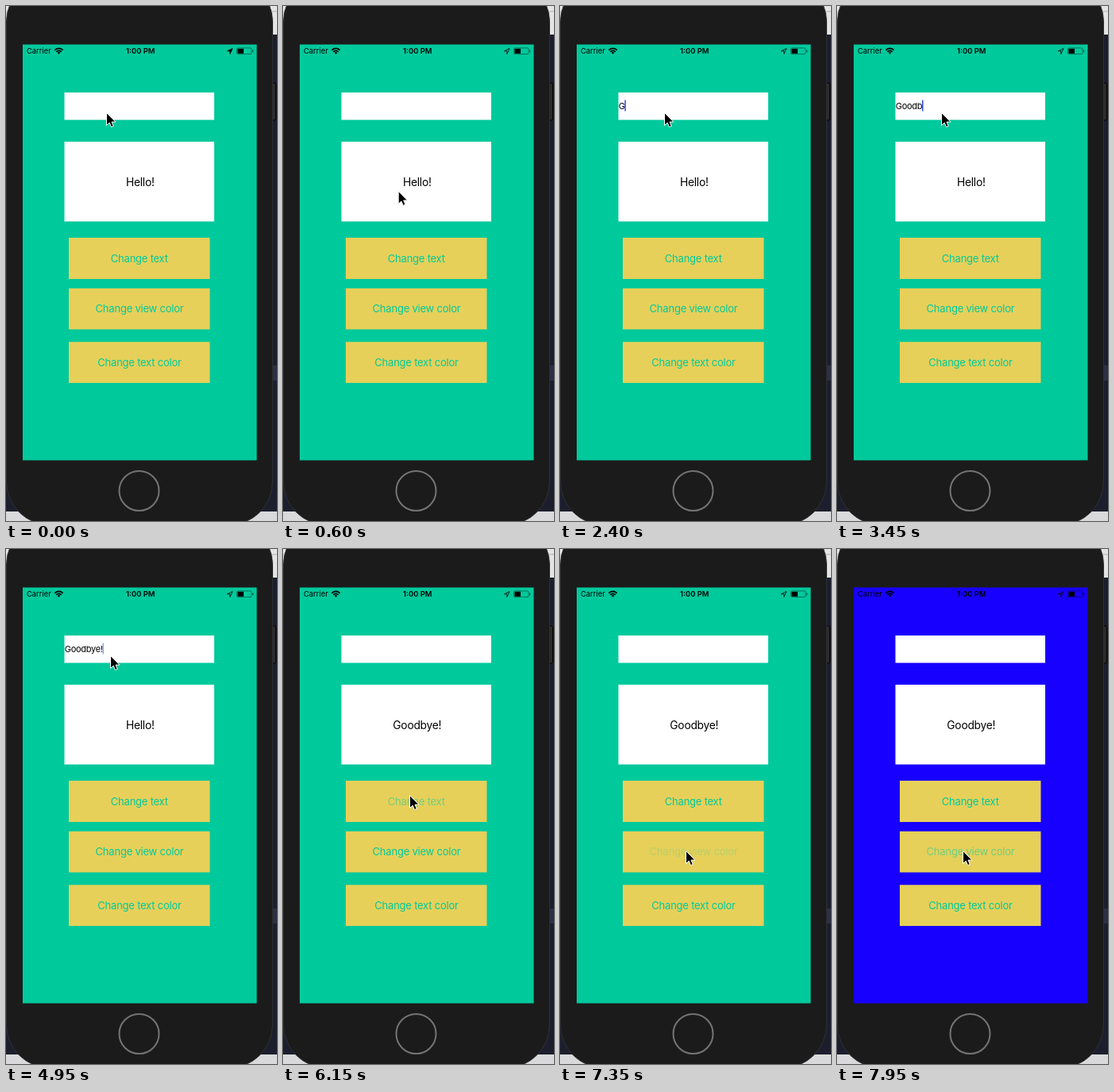
An HTML page for the animation above (8000 ms loop, 341 px wide and 649 px high).

```html
<!DOCTYPE html>
<html lang="en">
<head>
<meta charset="utf-8">
<title>Phone demo</title>
<style>
  html, body { margin: 0; height: 100%; overflow: hidden; background: #1d1e2d; }
  svg { display: block; width: 100vw; height: 100vh; font-family: Inter, Roboto, sans-serif; }
  .status { font-size: 9.4px; }
  .button text { font-size: 13px; letter-spacing: -.22px; fill: #00c99c; text-anchor: middle; }
  .button rect { fill: #e6d05a; }
  #label { font-size: 13.8px; letter-spacing: -.25px; text-anchor: middle; }
  #field { font-size: 11px; letter-spacing: -.25px; }
</style>
</head>
<body>
<svg viewBox="0 0 341 649">
  <!-- desktop behind the phone -->
  <rect width="341" height="649" fill="#1d1e2d"/>
  <rect width="341" height="36" fill="#e4e4e4"/>
  <rect y="6" width="341" height="1.5" fill="#c4c4c4"/>
  <rect x="330" y="453" width="11" height="19" fill="#2b3045"/>
  <rect y="637" width="341" height="12" fill="#d9d9db"/>
  <rect x="330" y="97" width="9.5" height="47" rx="2" fill="#2b2b2b" stroke="#000"/>

  <!-- phone -->
  <rect x=".5" y="-35" width="335" height="689" rx="55" fill="#1b1b1b" stroke="#303034"/>
  <circle cx="167.5" cy="611" r="25" fill="none" stroke="#747474" stroke-width="2"/>
  <rect id="screen" x="21" y="48.5" width="294.5" height="524"/>

  <!-- status bar -->
  <text class="status" x="26" y="60">Carrier</text>
  <g fill="none" stroke="#000" stroke-width="1.6">
    <path d="M61.3 55.6Q66.5 51.2 71.700 55.600M63.200 57.700Q66.500 54.900 69.800 57.700"/>
    <path d="M64.700 58.800Q66.500 57.400 68.300 58.800L66.500 60.800Z" fill="#000" stroke="none"/>
  </g>
  <text class="status" x="169.300" y="60" text-anchor="middle" font-weight="600">1:00 PM</text>
  <path id="location" d="M285 53.500L281.800 60.500V56.800H278.300Z" stroke="#000" stroke-width=".8"/>
  <rect x="290.500" y="52.900" width="18.500" height="7.700" rx="1.500" fill="none" stroke="#000" stroke-opacity=".55" stroke-width=".8"/>
  <rect x="291.500" y="53.800" width="7.500" height="6"/>
  <rect x="310" y="55.500" width="1.200" height="2.800" fill-opacity=".55"/>

  <!-- form -->
  <rect x="73.500" y="109" width="188.500" height="34.500" fill="#fff"/>
  <rect x="73.500" y="171" width="188.500" height="100.500" fill="#fff"/>
  <text id="field" x="73.700" y="130"></text>
  <rect id="caret" y="118.500" width="1.500" height="14" fill="#3048e0"/>
  <text id="label" x="168.800" y="226.500"></text>
  <g class="button"><rect x="79" y="292" width="177.500" height="52"/><text x="167.800" y="322.800">Change text</text></g>
  <g class="button"><rect x="79" y="355.800" width="177.500" height="51.700"/><text x="168" y="386.400">Change view color</text></g>
  <g class="button"><rect x="79" y="423.300" width="177.500" height="51.700"/><text x="168" y="454">Change text color</text></g>

  <path id="cursor" d="M0 0V16L3.700 12.600L6 18L8.800 16.900L6.500 11.600H11.400Z" stroke="#fff"/>
</svg>
<script>
const LOOP = 8000, STEP = 150;
const $ = id => document.getElementById(id);
const buttonTexts = document.querySelectorAll('.button text');

// Each track lists [start time, value...] in order.
const typed = [[0, ''], [2400, 'G'], [2700, 'Go'], [2850, 'Goo'], [3000, 'Good'], [3450, 'Goodb'],
  [3600, 'Goodby'], [3750, 'Goodbye'], [4500, 'Goodbye!'], [6150, '']];
const caretAlpha = [[0, 0], [1050, .5], [1200, 1], [1650, .5], [1800, 0], [2100, 1], [4350, .5],
  [4500, 1], [4950, .5], [5100, 0], [5400, 1], [6000, .5], [6150, 0]];
const textAlpha = [[0, 1], [6000, .2], [6150, .5], [6300, .8], [6450, 1]];
const viewAlpha = [[0, 1], [7350, .2], [7950, .5]];
const cursorPath = [[0, 126.500, 134.500], [450, 150, 268], [900, 131.500, 134.500], [5250, 131.500, 134.500],
  [5700, 159.500, 310.500], [6600, 159.500, 310.500], [7200, 158.500, 380.500]];

const indexAt = (track, t) => track.findLastIndex(key => key[0] <= t);
const valueAt = (track, t) => track[indexAt(track, t)][1];

function cursorAt(t) {
  const i = indexAt(cursorPath, t);
  const [start, x, y] = cursorPath[i];
  const [end, nextX, nextY] = cursorPath[i + 1] || [LOOP, x, y];
  const p = (t - start) / (end - start);
  const eased = p * p * (3 - 2 * p);
  return [x + (nextX - x) * eased, y + (nextY - y) * eased];
}

function draw(now) {
  const t = Math.floor((now % LOOP) / STEP) * STEP;
  const field = $('field');
  field.textContent = valueAt(typed, t);
  $('caret').setAttribute('x', 73.400 + field.getComputedTextLength());
  $('caret').setAttribute('opacity', valueAt(caretAlpha, t));
  $('label').textContent = t < 6150 ? 'Hello!' : 'Goodbye!';
  $('screen').setAttribute('fill', t < 7950 ? '#00c99c' : '#1800ff');
  $('location').setAttribute('fill', t < 600 ? '#000' : 'none');
  buttonTexts[0].setAttribute('opacity', valueAt(textAlpha, t));
  buttonTexts[1].setAttribute('opacity', valueAt(viewAlpha, t));
  $('cursor').setAttribute('transform', `translate(${cursorAt(t)})`);
  requestAnimationFrame(() => draw(performance.now()));
}
draw(performance.now());
</script>
</body>
</html>
```
